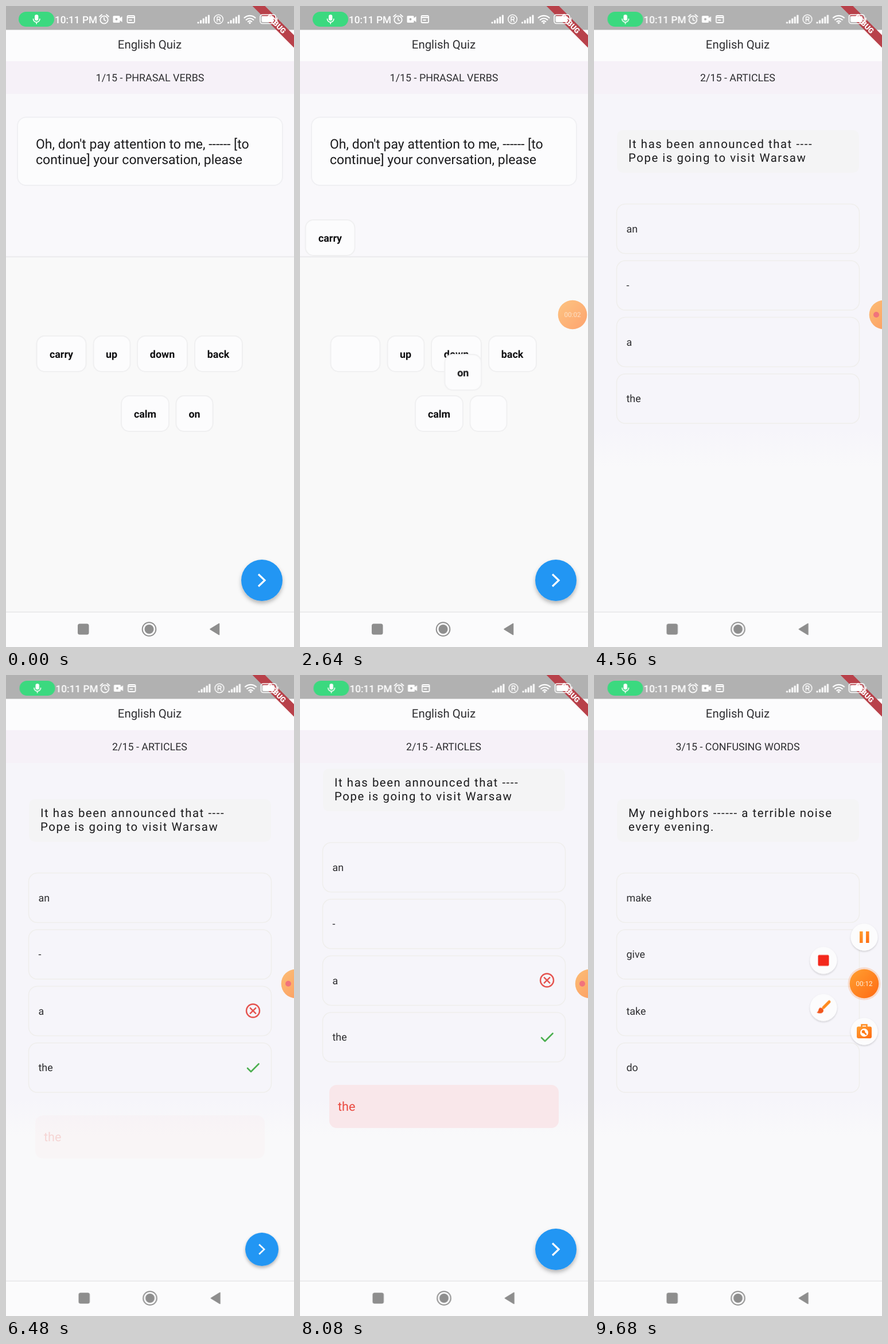
These frames come from a looping animation (502 px wide and 1115 px high, 9.84 s). An HTML page:

```html
<!DOCTYPE html>
<html lang="en">
<head>
<meta charset="utf-8">
<title>English Quiz</title>
<style>
html, body { margin: 0; width: 100%; height: 100%; overflow: hidden; background: #f9f9f9; }
svg { display: block; }
#stage { width: 502px; height: 1115px; }
text { font-family: Roboto, sans-serif; font-size: 17.9px; fill: #2d2d30; text-rendering: geometricPrecision; }
.mid { text-anchor: middle; }
.title { font-size: 20.4px; }
.ask { font-size: 23px; fill: #1a1a1c; }
.wide { font-size: 20.4px; letter-spacing: 1.53px; fill: #1a1a1c; }
.note { font-size: 21.7px; }
.tile text { font-weight: 700; fill: #0e0e10; text-anchor: middle; }
.tile rect, .slot { fill: #fcfcfd; stroke: #f0f0f1; stroke-width: 2; }
.card { fill: #f6f5fa; stroke: #efeeec; stroke-width: 1.5; }
.line { fill: none; stroke-linecap: round; stroke-linejoin: round; }

/* every animation shares one 9840 ms cycle: percentage = ms / 98.4 */
.anim { animation: 9.84s linear infinite; }
.hard { animation-timing-function: step-end; }

.nudge { animation-name: nudge; }
@keyframes nudge { 0% { transform: none; } 33.333%, 100% { transform: translateX(1.5px); } }

.carry { animation-name: carry; }
@keyframes carry { 0%, 17.276% { transform: none; } 19.715%, 100% { transform: translate(-44px, -202px); } }
.on { animation-name: on; }
@keyframes on { 0%, 26.26% { transform: none; } 28.73%, 100% { transform: translate(-189px, -306px); } }

.p1 { animation-name: p1; }
@keyframes p1 {
  0% { transform: none; }
  39.94% { transform: none; animation-timing-function: ease; }
  42.276%, 100% { transform: translateX(-502px); }
}
.p2 { animation-name: p2; }
@keyframes p2 {
  0% { transform: translateX(502px); }
  39.94% { transform: translateX(502px); animation-timing-function: ease; }
  42.276% { transform: none; }
  84.65% { transform: none; animation-timing-function: ease; }
  86.18%, 100% { transform: translateX(-502px); }
}
.p3 { animation-name: p3; }
@keyframes p3 {
  0% { transform: translateX(502px); }
  84.65% { transform: translateX(502px); animation-timing-function: ease; }
  86.18%, 100% { transform: none; }
}
.scroll { animation-name: scroll; }
@keyframes scroll {
  0% { transform: none; }
  74.187% { transform: none; animation-timing-function: cubic-bezier(.33, .66, .66, 1); }
  79.268%, 100% { transform: translateY(-53px); }
}

.t1 { animation-name: t1; }
@keyframes t1 { 0% { opacity: 1; } 41.06%, 100% { opacity: 0; } }
.t2 { animation-name: t2; }
@keyframes t2 { 0% { opacity: 0; } 41.06% { opacity: 1; } 85.3%, 100% { opacity: 0; } }
.t3 { animation-name: t3; }
@keyframes t3 { 0% { opacity: 0; } 85.3%, 100% { opacity: 1; } }

.right { animation-name: right; }
@keyframes right { 0%, 34.96% { opacity: 0; } 39.02%, 100% { opacity: 1; } }
.marks { animation-name: marks; }
@keyframes marks { 0% { opacity: 0; } 64.2%, 100% { opacity: 1; } }
.wrong { animation-name: wrong; }
@keyframes wrong { 0%, 65.04% { opacity: 0; } 69.1%, 100% { opacity: 1; } }

.fab { animation-name: fab; }
@keyframes fab {
  0%, 39.02% { transform: scale(1); }
  39.84%, 64.23% { transform: scale(0); }
  66.26%, 83.74% { transform: scale(1); }
  84.55%, 100% { transform: scale(0); }
}

.bubble { animation-name: bubble; }
@keyframes bubble {
  0%, .8% { transform: none; opacity: 0; }
  3.05%, 13.2% { transform: none; opacity: 1; }
  14.63%, 33.333% { transform: translateX(4px); opacity: .6; }
  34.96%, 45.12% { transform: translateX(25px); opacity: .6; }
  46.34%, 90.24% { transform: translateX(34px); opacity: .66; }
  91.06%, 100% { transform: none; opacity: 1; }
}
.glow { animation-name: glow; }
@keyframes glow { 0%, 13.2% { opacity: .25; } 14.63%, 90.24% { opacity: 0; } 91.06%, 100% { opacity: .25; } }
.clock { animation-name: clock; }
@keyframes clock { 0% { opacity: 1; } 14.5% { opacity: .7; } 46.3% { opacity: 0; } 91%, 100% { opacity: 1; } }
.dot { animation-name: dot; }
@keyframes dot { 0% { opacity: 0; } 46.3% { opacity: 1; } 91%, 100% { opacity: 0; } }
.reel { animation-name: reel; }
.reel text { font-size: 11.7px; fill: #fff0dc; text-anchor: middle; }
@keyframes reel {
  0% { transform: none; }
  9.1% { transform: translateY(-16px); }
  20% { transform: translateY(-32px); }
  30% { transform: translateY(-48px); }
  90.5% { transform: translateY(-64px); }
  95.93%, 100% { transform: translateY(-80px); }
}
.item { animation-name: item; }
@keyframes item {
  0%, 90.9% { transform: scale(0); opacity: 0; }
  91.06% { transform: scale(.2); opacity: 1; animation-timing-function: ease-out; }
  94.31%, 100% { transform: translate(var(--x), var(--y)); opacity: 1; }
}
</style>
</head>
<body>
<svg id="stage" viewBox="0 0 502 1115">
  <defs>
    <linearGradient id="orange" x1="0" y1="0" x2="1" y2="1">
      <stop offset="0" stop-color="#ffa032"/><stop offset="1" stop-color="#ff6a12"/>
    </linearGradient>
    <linearGradient id="page" x1="0" y1="0" x2="0" y2="1">
      <stop offset=".65" stop-color="#f6f5fa"/><stop offset=".72" stop-color="#f9f9fa"/>
    </linearGradient>
    <filter id="soft" x="-30%" y="-30%" width="160%" height="170%">
      <feDropShadow dx="0" dy="4" stdDeviation="3.5" flood-color="#000" flood-opacity=".28"/>
    </filter>
    <filter id="faint" x="-30%" y="-30%" width="160%" height="160%">
      <feDropShadow dx="0" dy="1.5" stdDeviation="1.5" flood-color="#000" flood-opacity=".18"/>
    </filter>
    <g id="bars" fill="#fff">
      <rect y="12" width="3" height="3" rx="1"/><rect x="4.6" y="9" width="3" height="6" rx="1"/>
      <rect x="9.2" y="6" width="3" height="9" rx="1"/><rect x="13.8" y="3" width="3" height="12" rx="1"/>
      <rect x="18.4" width="3" height="15" rx="1"/>
    </g>
    <g id="cards">
      <rect x="40" y="216" width="422" height="74" rx="10" fill="#f4f4f5"/>
      <rect class="card" x="39.5" y="344.5" width="423" height="86" rx="15"/>
      <rect class="card" x="39.5" y="443" width="423" height="86" rx="15"/>
      <rect class="card" x="39.5" y="541.5" width="423" height="86" rx="15"/>
      <rect class="card" x="39.5" y="640" width="423" height="86" rx="15"/>
    </g>
  </defs>

  <!-- pages -->
  <svg y="153" width="502" height="901" viewBox="0 153 502 901">
    <g class="anim p1">
      <rect y="153" width="502" height="901" fill="#f9f9f9"/>
      <rect y="153" width="502" height="283" fill="#f9f8fb"/>
      <rect y="435" width="502" height="2.5" fill="#ededef"/>
      <rect x="20" y="193.5" width="462" height="118.5" rx="15" fill="#fcfcfd" stroke="#f0f0f3" stroke-width="2"/>
      <text class="ask" x="52" y="247.5">Oh, don't pay attention to me, ------ [to</text>
      <text class="ask" x="52" y="274.5">continue] your conversation, please</text>
      <rect class="slot" x="53.5" y="574" width="86" height="62" rx="14"/>
      <rect class="slot" x="296.5" y="678" width="64" height="62" rx="14"/>
      <g class="tile"><rect x="152.5" y="574" width="64" height="62" rx="14"/><text x="184" y="611.5">up</text></g>
      <g class="tile"><rect x="229" y="574" width="87" height="62" rx="14"/><text x="272.5" y="611.5">down</text></g>
      <g class="tile"><rect x="329" y="574" width="83" height="62" rx="14"/><text x="370" y="611.5">back</text></g>
      <g class="tile"><rect x="201" y="678" width="83" height="62" rx="14"/><text x="242.5" y="715.5">calm</text></g>
      <g class="anim carry"><g class="tile"><rect x="53.5" y="574" width="86" height="62" rx="14"/><text x="96.5" y="611.5">carry</text></g></g>
      <g class="anim on"><g class="tile"><rect x="296.5" y="678" width="64" height="62" rx="14"/><text x="328.5" y="715.5">on</text></g></g>
      <g class="anim right">
        <rect x="11" y="898" width="484" height="80" rx="14" fill="#e6f4e8"/>
        <text class="note" x="26" y="933" style="fill:#4caf50">Phrasal verb 'to carry on' means 'to go on or</text>
        <text class="note" x="26" y="958.5" style="fill:#4caf50">continue with something'</text>
      </g>
    </g>

    <g class="anim p2">
      <rect y="153" width="502" height="901" fill="url(#page)"/>
      <g class="anim scroll">
        <use href="#cards"/>
        <text class="wide" x="60" y="246.5">It has been announced that ----</text>
        <text class="wide" x="60" y="271">Pope is going to visit Warsaw</text>
        <text x="56.5" y="393.5">an</text>
        <text x="56.5" y="492">-</text>
        <text x="56.5" y="590.5">a</text>
        <text x="56.5" y="689">the</text>
        <g class="anim hard marks">
          <g class="line" stroke="#e5534f" stroke-width="2.4">
            <circle cx="430.5" cy="584" r="11.5"/>
            <path d="M425.8 579.3l9.4 9.4m0-9.4l-9.4 9.4"/>
          </g>
          <path class="line" d="M421 684l6 6 13.5-13.5" stroke="#4caf50" stroke-width="2.6"/>
        </g>
        <g class="anim wrong">
          <rect x="51" y="766" width="400" height="75" rx="13" fill="#f9e7ea"/>
          <text class="note" x="66" y="811" style="fill:#ea4a40">the</text>
        </g>
      </g>
    </g>

    <g class="anim p3">
      <rect y="153" width="502" height="901" fill="url(#page)"/>
      <use href="#cards"/>
      <text class="wide" x="60" y="246.5">My neighbors ------ a terrible noise</text>
      <text class="wide" x="60" y="271">every evening.</text>
      <text x="56.5" y="393.5">make</text>
      <text x="56.5" y="492">give</text>
      <text x="56.5" y="590.5">take</text>
      <text x="56.5" y="689">do</text>
    </g>
  </svg>

  <!-- header -->
  <rect y="41" width="502" height="55" fill="#fcfcfd"/>
  <text class="mid title" x="250.5" y="73.5">English Quiz</text>
  <rect y="96" width="502" height="57" fill="#f6f1f8"/>
  <g class="mid">
    <text class="anim hard t1" x="251" y="130.5">1/15 - PHRASAL VERBS</text>
    <text class="anim hard t2" x="250.5" y="130.5">2/15 - ARTICLES</text>
    <text class="anim hard t3" x="250.5" y="130.5">3/15 - CONFUSING WORDS</text>
  </g>

  <!-- status bar -->
  <rect width="502" height="41.5" fill="#b1b1b1"/>
  <g transform="translate(502 0) rotate(45)">
    <rect x="-75" y="35.8" width="150" height="15.4" fill="#b8414a"/>
    <text class="mid" y="48.2" style="font-size:13px;font-weight:900;fill:#fff">DEBUG</text>
  </g>
  <g class="anim hard nudge">
    <rect x="22" y="10" width="62" height="26" rx="13" fill="#3bd97f"/>
    <rect x="50" y="15" width="6.4" height="10.5" rx="3.2" fill="#fff"/>
    <path class="line" d="M47.5 22.5a5.7 5.7 0 0 0 11.4 0M53.2 28.5v2.5" stroke="#fff" stroke-width="1.6"/>
    <text x="85" y="29.5" style="font-size:17.2px;font-weight:500;fill:#fff">10:11 PM</text>
    <g class="line" stroke="#fff" stroke-width="1.8">
      <circle cx="171" cy="24" r="6.7"/>
      <path d="M171 20.5V24l2.5 1.5M163 18.5l4-3.5M179 18.5l-4-3.5"/>
      <rect x="211.5" y="17" width="12.5" height="12" rx="1.5"/>
      <path d="M212 20h12M215 24.5h4"/>
      <circle cx="370.500" cy="23" r="7.8" stroke-width="1.5"/>
      <path d="M368 27v-8h3.200a2.200 2.200 0 0 1 0 4.500H368m3 0l2.500 3.500" stroke-width="1.400"/>
    </g>
    <path d="M188 17h9a1.500 1.500 0 0 1 1.500 1.500v2.500l4-3v10l-4-3v2.500a1.500 1.500 0 0 1-1.500 1.500h-9a1.500 1.500 0 0 1-1.500-1.500v-9a1.500 1.500 0 0 1 1.500-1.500z" fill="#fff"/>
    <circle cx="192.500" cy="23" r="2" fill="#b1b1b1"/>
    <use href="#bars" x="333.500" y="15.500"/>
    <use href="#bars" x="386" y="15.500"/>
    <g class="line" stroke="#fff" stroke-width="2.200">
      <path d="M415.500 20.500a14 14 0 0 1 19 0M418.700 24a9.200 9.200 0 0 1 12.600 0M421.800 27.200a4.500 4.500 0 0 1 6.400 0"/>
    </g>
    <circle cx="425" cy="29.500" r="1.700" fill="#fff"/>
    <rect x="443" y="15" width="27" height="15.500" rx="4" fill="none" stroke="#fff" stroke-width="1.600"/>
    <rect x="445.500" y="17.500" width="21" height="10.500" rx="2" fill="#fff"/>
    <rect x="471.200" y="20" width="2" height="6" rx="1" fill="#fff"/>
  </g>

  <!-- navigation bar -->
  <rect y="1054" width="502" height="61" fill="#fbfbfc"/>
  <rect y="1053.500" width="502" height="1.500" fill="#e6e6e8"/>
  <g class="anim hard nudge" fill="#8e8e8e">
    <rect x="125" y="1074.500" width="19.500" height="19" rx="3.500"/>
    <circle cx="249.500" cy="1084" r="11.800" fill="none" stroke="#8e8e8e" stroke-width="2"/>
    <circle cx="249.500" cy="1084" r="8"/>
    <path d="M356 1084l15.500-9.500v19z" stroke="#8e8e8e" stroke-width="1.500" stroke-linejoin="round"/>
  </g>

  <!-- next button -->
  <g transform="translate(446 999)">
    <g class="anim fab">
      <circle r="36" fill="#2196f3" filter="url(#soft)"/>
      <path d="M-6-10.500L5 0-6 10.500" fill="none" stroke="#fff" stroke-width="3.200"/>
    </g>
  </g>

  <!-- recorder bubble and its menu -->
  <g transform="translate(471 537)">
    <g class="anim item" style="--x:0px;--y:-81px">
      <circle r="23.500" fill="#fcfcfd" filter="url(#faint)"/>
      <path d="M-8-10h5.500v20H-8zM3-10h5.500v20H3z" fill="url(#orange)"/>
    </g>
    <g class="anim item" style="--x:-71px;--y:-40.500px">
      <circle r="23.500" fill="#fcfcfd" filter="url(#faint)"/>
      <rect x="-9.500" y="-9.500" width="19" height="19" rx="2" fill="#f3281c"/>
    </g>
    <g class="anim item" style="--x:-71px;--y:41.500px">
      <circle r="23.500" fill="#fcfcfd" filter="url(#faint)"/>
      <path class="line" d="M10-10L0 0" stroke="#ff8a1e" stroke-width="5"/>
      <path d="M-12 8.500q3-1 3.500-5Q-7-1.500-2.500 1 2 5-1.500 8.500-5.500 11.500-12 8.500z" fill="#f2561c"/>
    </g>
    <g class="anim item" style="--x:0px;--y:83px">
      <circle r="23.500" fill="#fcfcfd" filter="url(#faint)"/>
      <path d="M-4.500-7.500v-4h9v4" fill="none" stroke="#ff8a1e" stroke-width="2.500"/>
      <rect x="-13" y="-8.500" width="26" height="20.500" rx="3" fill="url(#orange)"/>
      <circle cy="2" r="7" fill="#fff"/>
      <path class="line" d="M-1 1l4 4" stroke="#ff7a18" stroke-width="2.600"/>
      <circle cx="-1.500" cy=".5" r="2.800" fill="#ff7a18"/>
    </g>
    <g class="anim bubble">
      <circle class="anim glow" r="28.500" fill="#ff8a3c"/>
      <circle r="25.300" fill="url(#orange)"/>
      <g class="anim hard clock">
        <svg x="-20" y="-8" width="40" height="16">
          <g class="anim hard reel">
            <text x="20" y="12.300">00:00</text>
            <text x="20" y="28.300">00:01</text>
            <text x="20" y="44.300">00:02</text>
            <text x="20" y="60.300">00:03</text>
            <text x="20" y="76.300">00:11</text>
            <text x="20" y="92.300">00:12</text>
          </g>
        </svg>
      </g>
      <circle class="anim hard dot" cx="-13" r="5" fill="#ee2f3c"/>
    </g>
  </g>
</svg>
</body>
</html>
```
